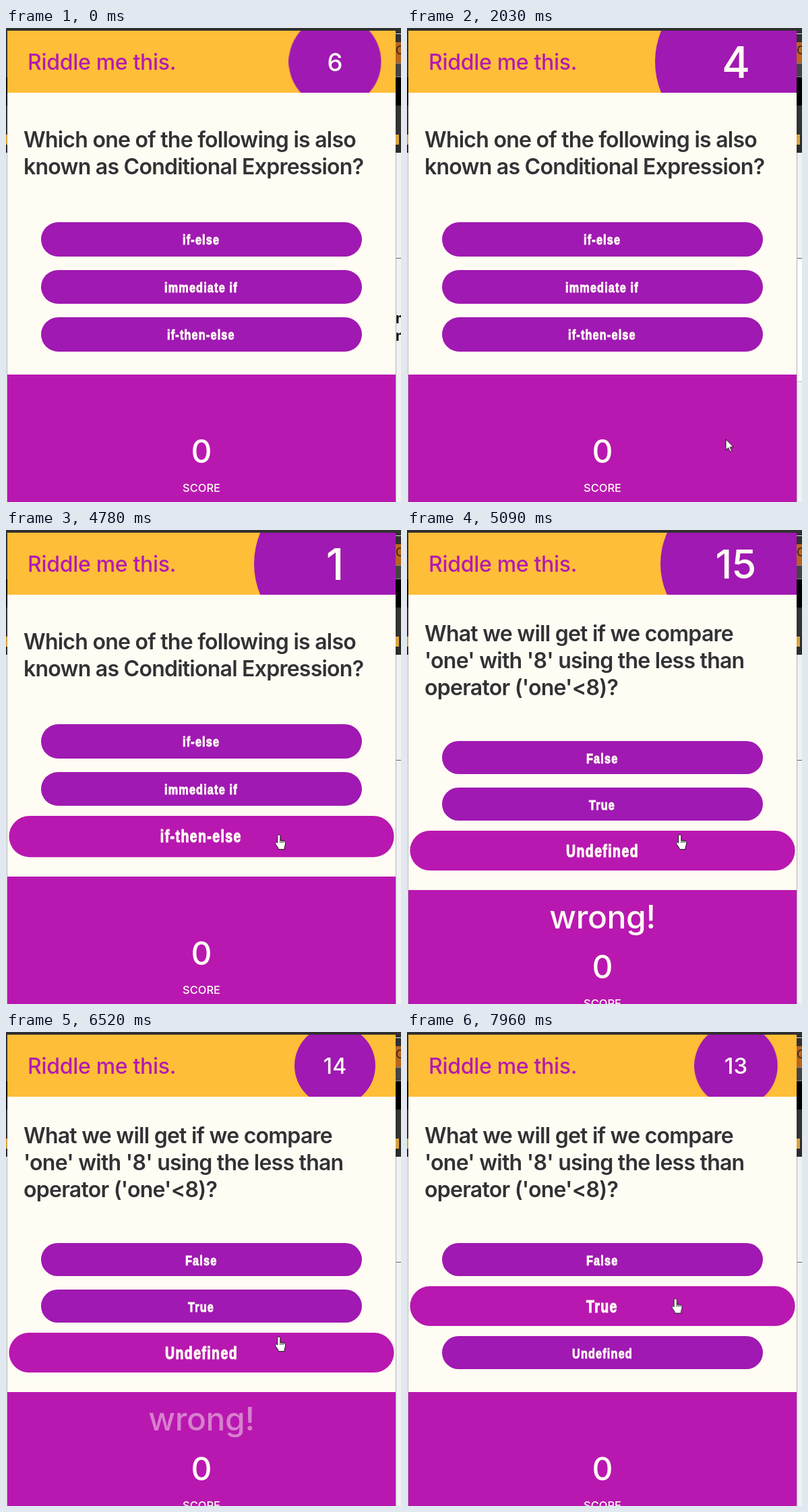
An HTML page that plays this animation: 586 px wide and 703 px high, repeating every 8000 ms.

```html
<!DOCTYPE html>
<html lang="en">
<head>
<meta charset="utf-8">
<title>Riddle me this.</title>
<style>
  :root { --violet: #a019b2; --magenta: #b818b0; --cream: #fffcf4; --amber: #ffbe37; }
  * { box-sizing: border-box; }
  html, body { margin: 0; width: 100%; height: 100%; overflow: hidden; }
  body {
    position: relative;
    color: var(--cream);
    font: 400 32px/40px Inter, sans-serif;
    font-optical-sizing: none;
    background: linear-gradient(#303030 73px, #000 0 115px, #333 0 158px, #d9a441 0 173px,
      #2c2c2c 0 185px, #f1f1f2 0);
  }

  /* 1% of the loop is 80 ms */
  .timed { animation: 8s step-end infinite; }
  .abs, .page i, .panel, .circle, .quiz, .quiz > *, .cursor { position: absolute; }

  /* Strip of the page behind the quiz */
  .page i { left: 578px; width: 8px; overflow: hidden; font-style: normal; }
  .tick { top: 8px; height: 1px; background: #ddd; }
  .badge { top: 21px; height: 31px; background: #b8651e; color: #222; font-size: 17px; line-height: 24px; }
  .rule { top: 52px; height: 21px; background: #444; border: solid #888; border-width: 1px 0; }
  .page .gap { left: 583px; width: 3px; top: 158px; height: 15px; background: #2c2c2c; }
  .line { top: 341px; height: 1px; background: #666; }
  .words { top: 418px; height: 52px; color: #111; font-weight: 700; font-size: 21px; line-height: 26px; animation-name: words; }
  .sheet { top: 342px; height: 183px; background: #fff; border-bottom: 1px solid #bbb; visibility: hidden; animation-name: sheet; }
  @keyframes words { 0% { visibility: visible; } 4.9%, to { visibility: hidden; } }
  @keyframes sheet { 4.9% { visibility: visible; } 28.375%, to { visibility: hidden; } }

  .panel { left: 2px; top: 4px; width: 576px; height: 699px; background: var(--cream); overflow: hidden; }
  .edge { left: 1px; top: 185px; width: 578px; height: 518px; border: solid #b5b5b8; border-width: 0 1px; }
  header { position: relative; height: 92px; background: var(--amber); overflow: hidden; }
  h1 { margin: 0; left: 30px; top: 27px; color: #b41ab2; font: inherit; font-weight: 550; letter-spacing: -.3px; white-space: nowrap; }

  .circle {
    left: 426px; top: -14px; width: 120px; height: 120px; border-radius: 50%;
    background: var(--violet); font-weight: 500; text-align: center;
    animation: pulse 8s linear infinite;
  }
  .window { margin: 40.6px 20px; height: 40px; overflow: hidden; }
  .window b { display: block; font-weight: inherit; height: 40px; }
  .reel { animation-name: count; }
  @keyframes pulse {
    0% { scale: 1.14; } .875% { scale: 1.295; } 2.125% { scale: 1.513; } 3.375% { scale: 1.683; }
    4.625% { scale: 1.802; } 5.875% { scale: 1.885; } 8.375% { scale: 1.976; }
    10.5%, 63.62% { scale: 2; }
    63.625% { scale: 1.87; } 64.5% { scale: 1.705; } 65.75% { scale: 1.487; } 67% { scale: 1.317; }
    68.25% { scale: 1.198; } 69.5% { scale: 1.115; } 72% { scale: 1.024; }
    74%, 86.25% { scale: 1; }
    87.5% { scale: 1.095; } 88.625% { scale: 1.27; } 89.375% { scale: 1.19; } 90.1% { scale: 1.085; }
    90.8% { scale: 1.03; }
    92.25%, 98.875% { scale: 1; }
    99.5% { scale: 1.03; } to { scale: 1.06; }
  }
  @keyframes count {
    0% { translate: 0 0; } .875% { translate: 0 -40px; } 13.75% { translate: 0 -80px; }
    26.375% { translate: 0 -120px; } 38.25% { translate: 0 -160px; } 51% { translate: 0 -200px; }
    63.625% { translate: 0 -240px; } 76% { translate: 0 -280px; } 88.625%, to { translate: 0 -320px; }
  }

  .quiz { inset: 0; }
  .first { animation-name: first; }
  .second { animation-name: second; }
  @keyframes first { 0% { visibility: visible; } 63.625%, to { visibility: hidden; } }
  @keyframes second { 0% { visibility: hidden; } 63.625%, to { visibility: visible; } }

  .quiz p { margin: 0; left: 24px; color: #323234; font-weight: 580; letter-spacing: -.75px; white-space: nowrap; }
  .quiz ul { margin: 0; padding: 0; left: 50px; width: 475.5px; list-style: none; display: grid; gap: 20px; }
  .quiz li {
    height: var(--tall); border-radius: 30px; background: var(--violet);
    display: grid; place-items: center;
    font: 700 16.2px/20px "Liberation Sans", Arial, sans-serif; letter-spacing: 1.2px;
  }
  .quiz li span { transform: scaleY(1.3); -webkit-text-stroke: .8px; }
  .first p { top: 142px; }
  .first ul { top: 284px; --tall: 50.5px; }
  .second p { top: 130px; }
  .second ul { top: 309px; --tall: 49px; }
  .late { animation-name: late; }
  .held { animation-name: held; }
  .last { animation-name: last; }
  @keyframes late { 58.75%, to { scale: 1.2; background: var(--magenta); } }
  @keyframes held { 0% { scale: 1.2; background: var(--magenta); } 96.5%, to { scale: 1; background: var(--violet); } }
  @keyframes last { 96.5%, to { scale: 1.2; background: var(--magenta); } }

  .quiz footer { left: 0; width: 100%; height: 220px; background: var(--magenta); text-align: center; font-weight: 450; }
  .first footer { top: 510px; }
  .second footer { top: 530px; }
  footer * { position: absolute; width: 100%; left: 0; }
  .wrong { top: 19.5px; font-size: 48px; letter-spacing: -.4px; animation: fade 8s linear infinite; }
  .score { top: 94px; font-size: 48px; }
  .label { top: 148px; font-size: 16.5px; }
  @keyframes fade {
    0%, 63.625% { opacity: 1; animation-timing-function: steps(31); }
    95%, to { opacity: 0; }
  }

  .cursor { left: 0; top: 0; overflow: visible; fill: #fff; stroke: #111; stroke-width: 1; visibility: hidden; }
  .arrow { animation-name: arrow; }
  .hand { animation-name: hand; }
  @keyframes arrow {
    11.75% { visibility: visible; translate: 473px 609.5px; }
    25.375% { visibility: visible; translate: 472.5px 609.5px; }
    26.375% { visibility: visible; translate: 472px 609.5px; }
    56.75% { visibility: visible; translate: 455px 568px; }
    57.75% { visibility: visible; translate: 425px 500px; }
    58.75%, to { visibility: hidden; translate: 425px 500px; }
  }
  @keyframes hand {
    58.75% { visibility: visible; translate: 403px 460px; }
    59.75% { visibility: visible; translate: 399px 451px; }
    96.5% { visibility: visible; translate: 395px 418px; }
    97.5%, to { visibility: visible; translate: 392.5px 394.5px; }
  }
</style>
</head>
<body>
  <div class="page">
    <i class="tick"></i><i class="badge">C</i><i class="rule"></i><i class="gap"></i>
    <i class="timed words">m<br>n</i><i class="timed sheet"></i><i class="line"></i>
  </div>
  <div class="abs edge"></div>

  <main class="panel">
    <header>
      <h1 class="abs">Riddle me this.</h1>
      <div class="circle"><div class="window"><div class="timed reel">
        <b>6</b><b>5</b><b>4</b><b>3</b><b>2</b><b>1</b><b>15</b><b>14</b><b>13</b>
      </div></div></div>
    </header>

    <section class="timed quiz first">
      <p>Which one of the following is also<br>known as Conditional Expression?</p>
      <footer><div class="score">0</div><div class="label">SCORE</div></footer>
      <ul>
        <li><span>if-else</span></li>
        <li><span>immediate if</span></li>
        <li class="timed late"><span>if-then-else</span></li>
      </ul>
    </section>

    <section class="timed quiz second">
      <p>What we will get if we compare<br>'one' with '8' using the less than<br>operator ('one'&lt;8)?</p>
      <footer><div class="wrong">wrong!</div><div class="score">0</div><div class="label">SCORE</div></footer>
      <ul>
        <li><span>False</span></li>
        <li class="timed last"><span>True</span></li>
        <li class="timed held"><span>Undefined</span></li>
      </ul>
    </section>
  </main>

  <svg class="timed cursor arrow" width="12" height="20">
    <path d="M.5.5v16l3.7-3.5 2.6 6 2.6-1.1-2.6-5.9h5z"/>
  </svg>
  <svg class="timed cursor hand" width="16" height="24">
    <path d="M5.8 1c1.4 0 2.1.9 2.1 2v6l5.6 1.2c1.6.4 2.2 1.2 2.2 2.5 0 4-1.7 5-1.7 10H5.4c-.4-3.3-4.4-6.3-4.9-9.4 0-1.5 1.7-1.7 3.2-.2V3c0-1.1.7-2 2.1-2z"/>
    <path d="M7.9 9v4M10.4 10v3M13 10.5V13"/>
  </svg>
</body>
</html>
```
